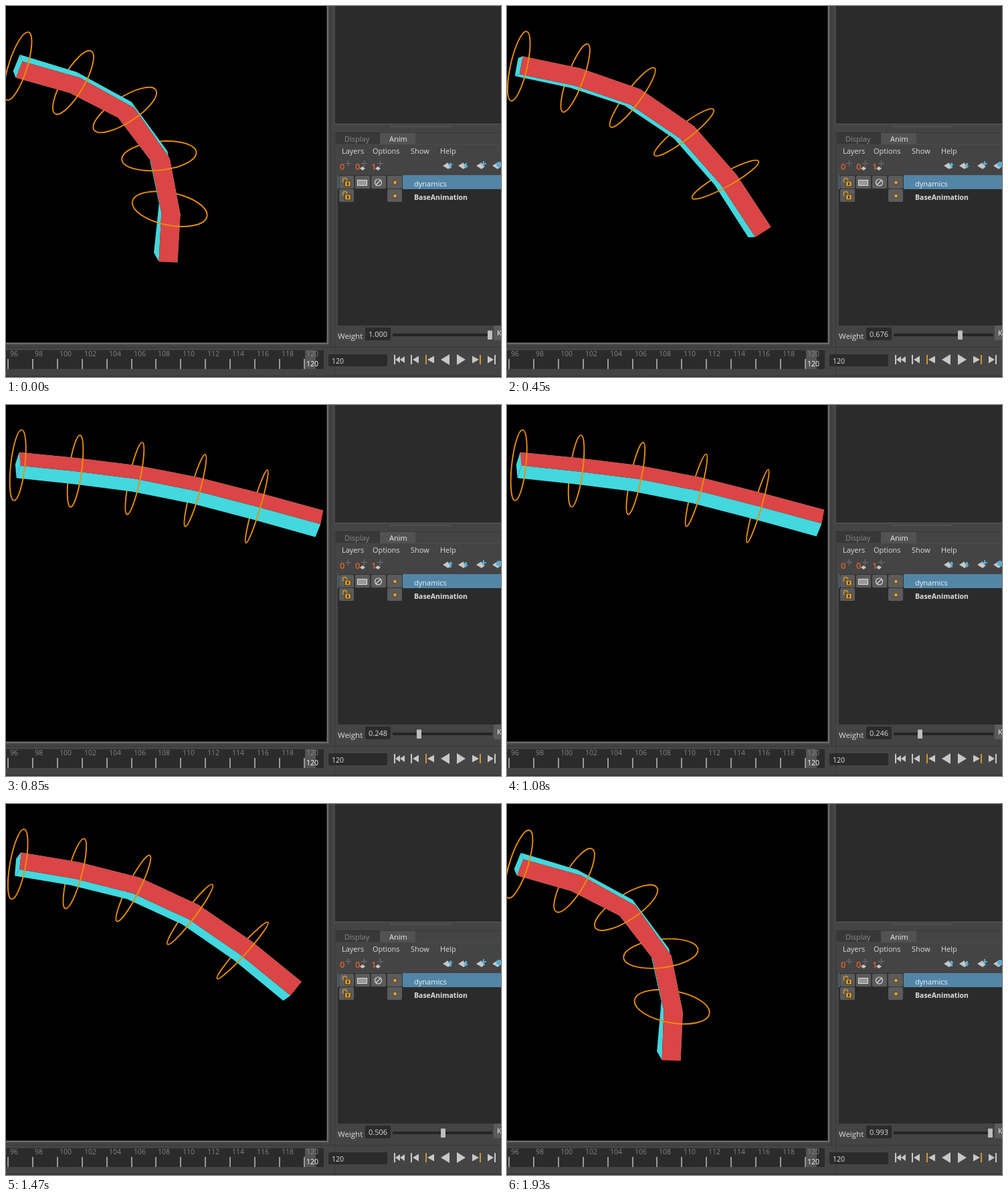
Animation of 740x555 px, one loop 2.02 s. Source, as an HTML page:

```html
<!DOCTYPE html>
<html lang="en">
<head>
<meta charset="utf-8">
<title>Layer weight</title>
<style>
  html, body { margin: 0; width: 100%; height: 100%; overflow: hidden; background: #444; }
  svg { display: block; width: 740px; height: 555px; }
  text { font: 11px "Open Sans", "Noto Sans", sans-serif; fill: #ddd; white-space: pre; }
  .dim { fill: #8a8a8a; }
  .num { font-size: 10.5px; fill: #858585; }
  .dark { fill: #2b2b2b; }
  .btn { fill: #5b5b5b; }
  .pale { fill: #c8c8c8; }
  .gold { fill: #cf9733; }
  .ring { fill: none; stroke: #e98f0c; stroke-width: 1.9; }
</style>
</head>
<body>
<svg viewBox="0 0 740 555">
  <defs>
    <clipPath id="view"><rect width="479" height="503"/></clipPath>
    <rect id="box" class="btn" width="22" height="19" rx="2"/>
    <g id="lock">
      <use href="#box"/>
      <path d="M5.500 10V6.500a3 3 0 0 1 6 0V8" fill="none" stroke="#cf9733" stroke-width="1.500"/>
      <rect class="gold" x="8.500" y="8" width="9" height="8" stroke="#4a3a18"/>
      <path d="M12 10h2v4h-2z" fill="#3a2c10"/>
    </g>
    <g id="dot">
      <use href="#box"/>
      <circle cx="11.500" cy="10" r="3" fill="#e0a040" stroke="#4a3a20"/>
    </g>
    <path id="cross" d="M0 -4v3M0 1v3M-4 0h3M1 0h3" stroke="#aaa" stroke-dasharray="1 1"/>
    <path id="gem" class="pale" d="M-8 0L0 -5V5ZM0 -3L5 1L0 5Z"/>
  </defs>

  <rect width="740" height="555" fill="#444"/>
  <rect width="482" height="506" fill="#6c6c6c"/>
  <rect width="480" height="504" fill="#333"/>
  <rect width="479" height="503"/>
  <path d="M485.500 0V510M0 510.500H740" stroke="#373737"/>
  <g clip-path="url(#view)">
    <path id="back" class="ring"/>
    <g fill="#43d7de"><path id="under"/><path id="over"/><path id="cap"/></g>
    <path id="front" fill="#db4545"/>
    <path id="near" class="ring"/>
  </g>

  <rect x="491" y="-2" width="252" height="178.500" fill="#2b2b2b" stroke="#5a5a5a"/>
  <path d="M576 180h88" stroke="#999" stroke-dasharray="1 2"/>
  <path d="M491.500 555V189.500H740" fill="none" stroke="#383838"/>
  <path d="M494 207V190h64v17z" fill="#383838" stroke="#303030"/>
  <path d="M559 207V190h53v17z" fill="#525252"/>
  <path d="M492 207h248" stroke="#4e4e4e"/>
  <text class="dim" x="506" y="203">Display</text>
  <text x="573" y="203" style="fill:#eee">Anim</text>
  <text x="502" y="221">Layers</text>
  <text x="548" y="221">Options</text>
  <text x="605" y="221">Show</text>
  <text x="649" y="221">Help</text>

  <g id="tools"></g>

  <rect class="dark" x="496" y="253" width="244" height="225"/>
  <rect x="496" y="253" width="244" height="21" fill="#5285a6"/>
  <rect x="497" y="253" width="96" height="21" fill="#333"/>
  <use href="#lock" x="498" y="254"/>
  <use href="#box" x="522" y="254"/>
  <use href="#box" x="546" y="254"/>
  <rect x="525.500" y="260.500" width="14" height="8" fill="#999" stroke="#ddd"/>
  <g fill="none" stroke="#ddd" stroke-width="1.200"><circle cx="556.500" cy="264" r="5"/><path d="M553 267.500l7-7"/></g>
  <use href="#dot" x="570" y="254"/>
  <use href="#lock" x="498" y="274"/>
  <use href="#dot" x="570" y="274"/>
  <text x="610" y="270" style="fill:#eef3f6;font-weight:500">dynamics</text>
  <text x="610" y="290" style="font-size:10.500px;font-weight:700">BaseAnimation</text>

  <text x="496" y="498" style="font-size:11.500px">Weight</text>
  <rect class="dark" x="537" y="481" width="38" height="19" rx="2"/>
  <text id="value" x="542" y="495">1.000</text>
  <rect x="578" y="490" width="149" height="4" rx="1" fill="#242424"/>
  <rect id="knob" x="720" y="485.500" width="7" height="13.500" rx="1" fill="#bdbdbd"/>
  <rect class="btn" x="729" y="478" width="20" height="22" rx="2"/>
  <text x="734" y="493" style="fill:#eee">K</text>

  <rect class="dark" x="0" y="515" width="475" height="28"/>
  <rect x="447" y="515" width="16" height="28" fill="#555"/>
  <g id="ruler"></g>
  <text x="449" y="539" style="font-size:10.500px;fill:#fff">120</text>
  <rect class="dark" x="482" y="521" width="88" height="18" rx="2"/>
  <text x="487" y="535" style="font-size:10.500px">120</text>
  <g id="play" class="pale"></g>
  <path d="M0 554h740" stroke="#353535" stroke-width="2"/>
</svg>
<script>
const $ = id => document.getElementById(id);
const LOOP = 2020;
const JOINTS = [0, 1, 2, 3, 4, 5];

// The slider drag: [step, time, weight]; steps are even between stops.
const stops = [
  [0, 0, 1], [4, 310, .754], [8, 600, .428], [12, 920, .21], [14, 1080, .246],
  [17, 1320, .435], [21, 1630, .725], [25, 1930, .993], [26, LOOP, 1]
];

function slope(i) {
  const a = stops[Math.max(i - 1, 0)], b = stops[Math.min(i + 1, stops.length - 1)];
  return (b[2] - a[2]) / (b[0] - a[0]);
}

function weightAt(time) {
  const i = stops.findLastIndex(s => s[1] <= time);
  const [n, t, w] = stops[i], [n2, t2, w2] = stops[i + 1];
  const span = n2 - n;
  const s = Math.floor((time - t) / (t2 - t) * span + 1e-6) / span;
  const ease = s * s * (3 - 2 * s);
  return w + (w2 - w) * ease +
    span * s * (1 - s) * (slope(i) * (1 - s) - slope(i + 1) * s);
}

// Full bend of each segment, in degrees.
const swing = [14, 27.3, 54.4, 81.4, 99.1];
const bend = (i, w) => 2.4 - 1.7 * i + swing[i] * (w - .065 * i * w * (1 - w));

// Foreshortened length: nearer segments look longer, strongly bent ones shorter.
const reach = (i, w) =>
  86.3 + 2.7 * i + 3.5 * i * (4 - i) * w * w * (1 - w) - 1.5 * i * i * w ** 5;

// Joints of the bar, each with its tilted, rolled cross-section.
function chain(w) {
  let x = 17.7, y = 90;
  return JOINTS.map(i => {
    const seg = Math.min(i, 4), angle = bend(seg, w);
    const tilt = 1.07 * angle, r = tilt * Math.PI / 180;
    const flat = .18 + .08 * w + .19 * seg * w * (w - .78);
    const roll = (83 * w - 20) * (1 - .12 * i * w * w) * Math.PI / 180;
    const size = 19.4 + .27 * i;
    const corner = q => {
      const n = size * Math.cos(roll + q * Math.PI / 2);
      const t = size * flat * Math.sin(roll + q * Math.PI / 2);
      return [cx + n * Math.sin(r) + t * Math.cos(r), cy - n * Math.cos(r) + t * Math.sin(r)];
    };
    const cx = x, cy = y;
    x += reach(seg, w) * Math.cos(angle * Math.PI / 180);
    y += reach(seg, w) * Math.sin(angle * Math.PI / 180);
    const radius = 53.2 + .9 * i;
    return { x: cx, y: cy, tilt, radius, minor: radius * flat, corners: [0, 1, 2, 3].map(corner) };
  });
}

const shape = pts => "M" + pts.map(p => p.map(n => n.toFixed(2)).join(" ")).join("L") + "Z";

function halfRing({ x, y, tilt, radius, minor }, sweep) {
  const r = tilt * Math.PI / 180, dx = radius * Math.sin(r), dy = -radius * Math.cos(r);
  return `M${x + dx} ${y + dy}A${radius} ${minor} ${tilt - 90} 0 ${sweep} ${x - dx} ${y - dy}`;
}

function drawBar(w) {
  const joints = chain(w);
  const edge = k => joints.map(j => j.corners[k]);
  const draw = (id, d) => $(id).setAttribute("d", d);
  const face = (a, b) => shape([...edge(a), ...edge(b).reverse()]);
  const rings = sweep => joints.slice(0, 5).map(j => halfRing(j, sweep)).join("");
  draw("front", face(0, 1));
  draw("under", face(1, 2));
  draw("over", face(3, 0));
  draw("cap", shape(joints[0].corners));
  draw("back", rings(0));
  draw("near", rings(1));
}

function buildStatic() {
  let ruler = "";
  for (let i = 0; i < 13; i++) {
    const x = Math.round(3 + 36.9 * i);
    ruler += `<text class="num" x="${x + 3}" y="524">${96 + 2 * i}</text>` +
      `<rect x="${x - 1}" y="528" width="2" height="15" fill="#999"/>`;
  }
  $("ruler").innerHTML = ruler;

  const digit = (x, s) => `<text x="${x}" y="245" style="font-size:13px;font-weight:600;fill:#e0622c">${s}</text>`;
  const cross = x => `<use href="#cross" x="${x}" y="235.5"/>`;
  const chip = x => `<path class="pale" d="M${x - 4} 243l4-3 4 3-4 3z"/>`;
  const gem = (x, mark) => `<use href="#gem" x="${x}" y="239"/><path d="${mark}" fill="#58acd0"/>`;
  $("tools").innerHTML =
    digit(499, 0) + cross(511.5) +
    digit(522, 0) + cross(535.5) + chip(533) +
    digit(546, 1) + cross(559.5) + chip(556) +
    gem(661, "M661 238l3.500-4 3.500 4h-2v5h-3v-5z") +
    gem(684, "M684 239l3.500 4 3.500-4h-2v-4h-3v4z") +
    gem(711, "M713 232h2v3h3v2h-3v3h-2v-3h-3v-2h3z") +
    gem(735, "M733 237a4 4 0 1 1 8 0a4 4 0 1 1-8 0");

  const bar = (x, gold) => `<rect x="${x}" y="522" width="2" height="14"${gold ? ' class="gold"' : ""}/>`;
  const tri = (x, w, h) => `<path d="M${x} 529l${w} ${-h}v${2 * h}z"/>`;
  $("play").innerHTML =
    bar(580) + tri(582, 7, 5) + tri(589, 7, 5) +
    bar(605) + tri(608, 9, 5.5) +
    bar(627, true) + tri(630, 10, 5.5) +
    tri(650, 13, 8) + tri(687, -13, 8) +
    tri(707, -10, 5.5) + bar(708, true) +
    tri(729, -9, 5.5) + bar(730);
}

const start = performance.now();

function tick() {
  const w = weightAt((performance.now() - start) % LOOP);
  drawBar(w);
  $("value").textContent = w.toFixed(3);
  $("knob").setAttribute("x", Math.round(720 - (1 - w) * 141));
  requestAnimationFrame(tick);
}

buildStatic();
tick();
</script>
</body>
</html>
```
